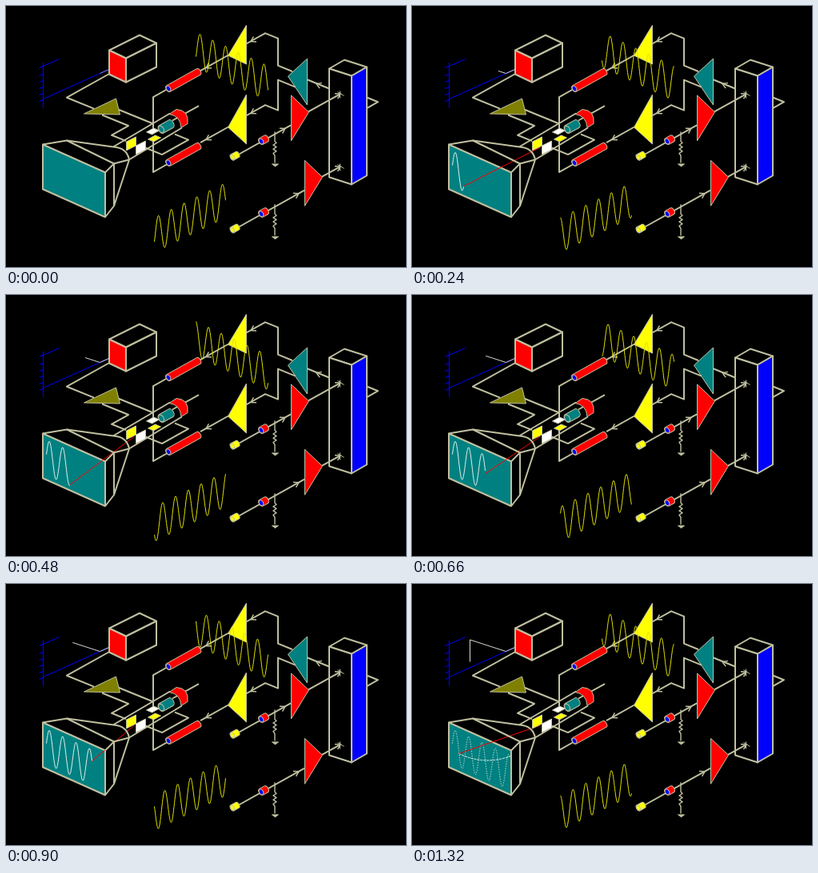
Write an HTML page with a canvas that moves like this. It is 500x327 px and loops after 1.38 s.

```html
<!DOCTYPE html>
<html>
<head>
<meta charset="utf-8">
<style>
  html, body { margin: 0; width: 100%; height: 100%; overflow: hidden; background: #000; }
  canvas { display: block; width: 500px; height: 327px; }
</style>
</head>
<body>
<canvas id="stage" width="500" height="327"></canvas>
<script>
const ctx = document.getElementById('stage').getContext('2d');
const WIRE = '#c0c0a0', RED = '#ff0000', YELLOW = '#ffff00', BLUE = '#0000ff';
const TEAL = '#008080', OLIVE = '#808000', WHITE = '#ffffff', BLACK = '#000000';
const STEP = 60, STEPS = 23, SWEEP_END = 19, TAU = Math.PI * 2;

// Directions of the slanted drawing, per pixel of width (or height).
const DEPTH = [1, -0.56], ACROSS = [1, 0.41], DOWN = [0, 1];
const along = ([x, y], [dx, dy], length) => [x + dx * length, y + dy * length];

function trace(points, width) {
  const shift = width === 1 ? 0.5 : 0;
  ctx.beginPath();
  for (const [x, y] of points) ctx.lineTo(x + shift, y + shift);
}
function line(points, color = WIRE, width = 2) {
  trace(points, width);
  ctx.strokeStyle = color;
  ctx.lineWidth = width;
  ctx.stroke();
}
function poly(points, fill, edge = WIRE, width = 1) {
  trace(points, width);
  ctx.closePath();
  ctx.fillStyle = fill;
  ctx.fill();
  ctx.strokeStyle = edge;
  ctx.lineWidth = width;
  ctx.stroke();
}

function wire(x, y, ...moves) {
  const points = [[x, y]];
  for (const [dir, length] of moves) points.push(along(points.at(-1), dir, length));
  line(points);
  return points.at(-1);
}
function face(x, y, [ax, ay], [bx, by], fill, width = 1) {
  poly([[x, y], [x + ax, y + ay], [x + ax + bx, y + ay + by], [x + bx, y + by]], fill, WIRE, width);
}
function prism(x, y, front, side, height, frontFill, sideFill) {
  const down = [0, height];
  face(x, y, front, side, BLACK, 2);
  face(x, y, front, down, frontFill, 2);
  face(x + front[0], y + front[1], side, down, sideFill, 2);
}
function triangle(tipX, tipY, baseX, up, down, fill) {
  poly([[tipX, tipY], [baseX, tipY - up], [baseX, tipY + down]], fill);
}

function cylinder(x, y, length, radius, fill, cap) {
  ctx.save();
  ctx.translate(x, y);
  ctx.rotate(-0.51);
  ctx.strokeStyle = WIRE;
  ctx.lineWidth = 1;
  ctx.fillStyle = fill;
  ctx.beginPath();
  ctx.ellipse(length, 0, radius * 0.6, radius, 0, -TAU / 4, TAU / 4);
  ctx.ellipse(0, 0, radius * 0.6, radius, 0, TAU / 4, TAU * 0.75);
  ctx.closePath();
  ctx.fill();
  ctx.stroke();
  ctx.fillStyle = cap;
  ctx.beginPath();
  ctx.ellipse(0, 0, radius * 0.55, radius * 0.8, 0, 0, TAU);
  ctx.fill();
  ctx.stroke();
  ctx.restore();
}

function arrow(x, y, side, [dx, dy] = DEPTH) {
  const angle = Math.atan2(dy * side, dx * side);
  const barb = turn => [x - 7 * Math.cos(angle + turn), y - 7 * Math.sin(angle + turn)];
  line([barb(0.55), [x, y], barb(-0.55)], WIRE, 1.5);
}

function resistor(x, y) {
  const points = [[x, y], [x, y + 12]];
  for (let i = 0; i < 6; i++) points.push([x + (i % 2 ? -2 : 2), y + 14 + i * 2.6]);
  points.push([x, y + 30], [x, y + 39]);
  line(points, WIRE, 1.4);
  poly([[x - 4, y + 40], [x + 4, y + 40], [x, y + 43]], WIRE);
}

function probe(y, lead) {
  const [x, endY] = wire(288, y, [DEPTH, lead]);
  cylinder(283, y + 2, 7, 4, YELLOW, YELLOW);
  cylinder(319, y - 18, 7, 4.5, RED, BLUE);
  resistor(336, y - 30);
  arrow(x - 7, endY + 4, 1);
  const tipX = x + 22, tipY = endY - 17;
  const [endX, pinY] = wire(tipX, tipY, [DEPTH, 418 - tipX]);
  triangle(tipX, tipY, x, 21, 36, RED);
  arrow(endX, pinY, 1);
  line([[endX - 4, pinY - 3], [endX + 4, pinY + 2]], WIRE, 1);
  line([[endX - 1, pinY - 4], [endX - 1, pinY + 5]], WIRE, 1);
}

// One of the two deflection amplifiers; bend is the run to the splitter.
function channel(y, up, down, bend, tail) {
  wire(300, y - 14, [DEPTH, 24], [ACROSS, 16], [DOWN, bend], [ACROSS, tail]);
  wire(278, y, [DEPTH, -35]);
  arrow(306, y - 17, -1);
  arrow(250, y + 16, -1);
  triangle(277, y, 300, up, down, YELLOW);
}

function tube() {
  const top = [135, 198], bottom = [135, 251], neck = [154, 193];
  line([[46, 174], [76, 169], top, [124, 209]]);
  line([top, bottom, [124, 265]]);
  line([[76, 169], [134, 177]]);
  line([top, neck, bottom]);
  ctx.beginPath();
  ctx.moveTo(134, 177);
  ctx.quadraticCurveTo(151, 178, ...neck);
  ctx.stroke();
  line([[134, 177], [205, 135]]);
  line([neck, [220, 153]]);
}

function gun() {
  wire(208, 144, [DEPTH, 33]);
  ctx.beginPath();
  ctx.moveTo(204, 136);
  ctx.quadraticCurveTo(218, 138, 219, 153);
  ctx.lineTo(227, 148);
  ctx.quadraticCurveTo(229, 131, 213, 130);
  ctx.closePath();
  ctx.fillStyle = RED;
  ctx.fill();
  ctx.lineWidth = 1;
  ctx.stroke();
  cylinder(194, 155, 14, 5.5, TEAL, TEAL);
  const flatA = [9, -5], flatB = [7, 3], upright = [12, -6], tall = [0, 11];
  face(175, 158, flatA, flatB, WHITE);
  face(177, 167, flatA, flatB, YELLOW);
  face(150, 170, upright, tall, YELLOW);
  face(162, 175, upright, tall, WHITE);
}

function wiring() {
  wire(130, 85, [DEPTH, -54], [ACROSS, 34]);
  wire(140, 130, [ACROSS, 44]);
  wire(120, 137, [ACROSS, 33], [DEPTH, -21], [ACROSS, 18]);
  wire(201, 105, [DEPTH, -17], [DOWN, 39]);
  wire(201, 199, [DEPTH, -17], [DOWN, -39]);
  wire(174, 178, [ACROSS, 21], [DEPTH, 33], [ACROSS, -17]);
  wire(404, 104, [ACROSS, -28]);
  wire(451, 115, [ACROSS, 14], [DEPTH, -14]);
  arrow(388, 98, -1, ACROSS);
}

function machine() {
  tube();
  wiring();
  gun();
  prism(129, 56, [21, 10], [38, -19], 30, RED, BLACK);
  triangle(352, 88, 376, 22, 36, TEAL);
  channel(62, 38, 11, 34, 18);
  channel(152, 41, 21, -38, 22);
  for (const y of [104, 197]) cylinder(203, y, 43, 4.5, RED, BLUE);
  poly([[97, 135], [137, 116], [142, 136]], OLIVE);
  prism(404, 79, [28, 9], [19, -11], 136, BLACK, BLUE);
  probe(188, 68);
  probe(279, 85);
}

function curve(from, to, f, color, dash = []) {
  const points = [];
  for (let x = from; x <= to; x += 0.5) points.push([x, f(x)]);
  ctx.setLineDash(dash);
  line(points, color, 1);
  ctx.setLineDash([]);
}

// The two travelling waves are mirror images of each other.
function waves(step) {
  const peak = 4 - step * 16 / 6;
  const swing = x => 22 * Math.cos((x - peak) * TAU / 16);
  curve(237, 327, x => 55 + 0.466 * (x - 238) - swing(x - 238), '#e0e000');
  curve(185, 274, x => 286 - 0.49 * (x - 186) + swing(186 - x), '#e0e000');
}

function sweepAxes() {
  line([[46, 70], [46, 127]], BLUE, 1);
  line([[41, 77], [66, 66]], BLUE, 1);
  for (let y = 86; y < 126; y += 8) line([[41, y + 1], [46, y - 1]], BLUE, 1);
  line([[46, 116], [128, 79]], BLUE, 1);
}
function sawtooth(step) {
  const x = Math.max(72, 116.5 - 2.25 * step);
  const points = [[128, 79], [117, 84]];
  if (step) points.push([x, 84 - (117 - x) * 0.325]);
  if (step > SWEEP_END) points.push([72, 69 + (step - SWEEP_END) * 9.3]);
  line(points, step ? '#d8d8d0' : '#8080e0', 1);
}

const signal = x => 203.8 + 0.45 * (x - 50) - 22 * Math.sin((x - 49.5) * TAU / 16.7);
const flyback = x => 221 - 8.5 * ((x - 94) / 36) ** 2;

function screen(step) {
  face(46, 174, [78, 35], [0, 56], TEAL, 2);
  if (!step) return;
  const back = step > SWEEP_END;
  const x = back ? 121 - 21 * (step - SWEEP_END) : 48.5 + 3.9 * step;
  if (back) {
    curve(50, 122, signal, '#c0d8d8', [1.5, 1.5]);
    curve(x, 122, flyback, WHITE, [3, 1]);
  } else {
    curve(50, x, signal, '#e0f0f0');
  }
  line([[x, (back ? flyback : signal)(x)], [160, 177]], RED, 1);
}

function draw(step) {
  ctx.fillStyle = BLACK;
  ctx.fillRect(0, 0, 500, 327);
  ctx.lineJoin = 'round';
  sweepAxes();
  ctx.save();
  ctx.translate(0, -0.5);
  screen(step);
  machine();
  ctx.restore();
  sawtooth(step);
  waves(step);
}

const start = performance.now();
function tick() {
  const elapsed = performance.now() - start;
  draw(Math.floor(elapsed / STEP) % STEPS);
  requestAnimationFrame(tick);
}
tick();
</script>
</body>
</html>
```
